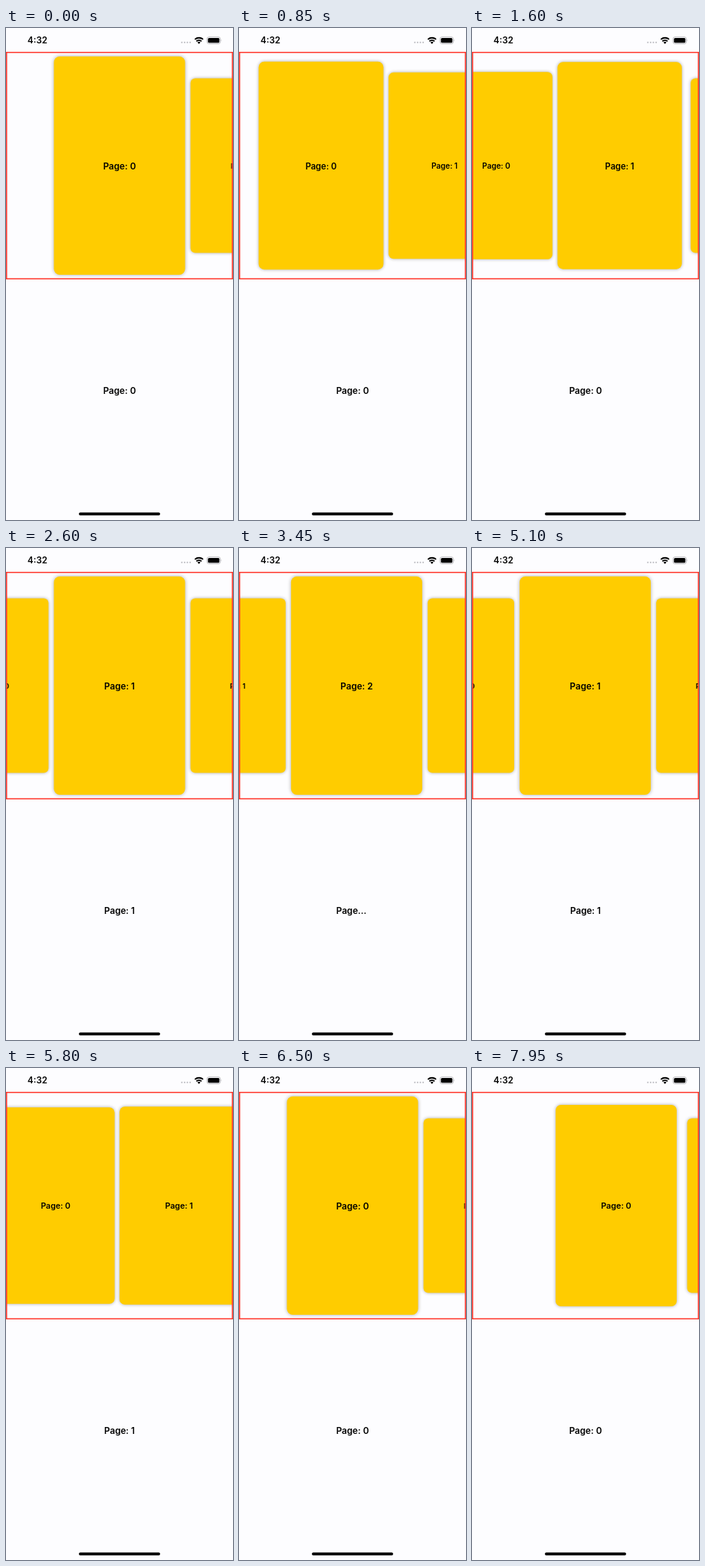
Recreate the animation shown at these times as an HTML page. Size 296x640 px, loop 8 s.

```html
<!DOCTYPE html>
<html lang="en">
<head>
<meta charset="utf-8">
<title>Page carousel</title>
<style>
  html, body { margin: 0; width: 100%; height: 100%; overflow: hidden; background: #fdfdff; }
  svg { display: block; width: 100%; height: 100%; }
  text { font-family: Inter, Roboto, sans-serif; font-size: 11.7px; font-weight: 600; text-anchor: middle; }
</style>
</head>
<body>
<svg viewBox="0 0 296 640">
  <defs>
    <filter id="soft" x="-10%" y="-10%" width="120%" height="120%">
      <feGaussianBlur stdDeviation="2.5"/>
    </filter>
  </defs>
  <rect width="296" height="640" fill="#fdfdff"/>

  <text x="41" y="20.2" style="font-size:11.5px">4:32</text>
  <g id="dots" fill="#b9b9be"></g>
  <g fill="none" stroke="#000" stroke-width="1.9">
    <path d="M246.3 14.9a7.6 7.6 0 0 1 10.6 0"/>
    <path d="M248.3 17.3a4.8 4.8 0 0 1 6.6 0"/>
  </g>
  <path d="M251.6 20.7l-1.9-2a2.7 2.7 0 0 1 3.8 0z"/>
  <rect x="262" y="11.7" width="17.6" height="8.8" rx="2.6" fill="none" stroke="#b0b0b4" stroke-width=".8"/>
  <rect x="263.3" y="13" width="15" height="6.2" rx="1.5"/>
  <path d="M280.6 14.6q1.3 1.5 0 3z" fill="#b0b0b4"/>

  <g id="cards"></g>
  <rect x=".75" y="31.75" width="294.5" height="294.5" fill="none" stroke="#ff3b30" stroke-width="1.5"/>
  <text id="label" y="475.8"></text>
  <rect x="95" y="630.2" width="106" height="3.8" rx="1.9"/>
</svg>
<script>
const LOOP = 8000, PITCH = 161, CX = 148, CY = 179, W = 171, H = 284;
const NS = "http://www.w3.org/2000/svg";

// Each swipe: start page, direction, release time, [time, travelled share] points
const swipes = [
  { from: 0, dir: 1, release: 1850, pts: [[500, 0], [850, .254], [1400, .62], [1850, .85], [1970, .966], [2150, 1]] },
  { from: 1, dir: 1, release: 3350, pts: [[2600, 0], [3000, .46], [3350, .85], [3450, .966], [3650, 1]] },
  { from: 2, dir: -1, release: 4850, pts: [[4100, 0], [4600, .557], [4850, .83], [4980, .966], [5200, 1]] },
  { from: 1, dir: -1, release: 6250, pts: [[5500, 0], [5800, .481], [6050, .72], [6250, .86], [6330, .966], [6500, 1]] },
  { from: 0, dir: -1, release: LOOP, pull: 1.62, pts: [[7450, 0], [7700, .145], [7950, .248], [8000, .25]] }
];

const clamp = (v, lo, hi) => Math.max(lo, Math.min(hi, v));

function add(parent, tag, attrs) {
  const el = document.createElementNS(NS, tag);
  for (const k in attrs) el.setAttribute(k, attrs[k]);
  return parent.appendChild(el);
}

// Smooth curve through the points, at rest at both ends
function curve(pts, t) {
  const last = pts.length - 1;
  if (t <= pts[0][0]) return 0;
  if (t >= pts[last][0]) return pts[last][1];
  const i = pts.findIndex(p => p[0] > t) - 1;
  const slope = j => j === 0 || j === last ? 0
    : (pts[j + 1][1] - pts[j - 1][1]) / (pts[j + 1][0] - pts[j - 1][0]);
  const [t0, a] = pts[i], [t1, b] = pts[i + 1], d = t1 - t0, u = (t - t0) / d;
  const ease = u * u * (3 - 2 * u);
  return a + (b - a) * ease + d * u * (1 - u) * ((1 - u) * slope(i) - u * slope(i + 1));
}

function cardScale(distance) {
  const d = clamp(Math.abs(distance), 0, 1);
  return 1 - .2 * d + .015 * d * (1 - d);
}

const dots = document.getElementById("dots");
for (let i = 0; i < 4; i++) add(dots, "circle", { cx: 229.3 + i * 3.6, cy: 18.8, r: 1 });

const holder = document.getElementById("cards");
const cards = [0, 1, 2, 3].map(n => {
  const g = add(holder, "g", {});
  const box = { x: -W / 2, y: -H / 2, width: W, height: H, rx: 7.5 };
  add(g, "rect", { ...box, opacity: .33, filter: "url(#soft)" });
  add(g, "rect", { ...box, fill: "#ffcc00" });
  add(g, "text", { y: 4.8 }).textContent = "Page: " + n;
  return g;
});
const label = document.getElementById("label");

function draw(t) {
  const s = swipes.filter(w => t >= w.pts[0][0]).pop() || swipes[0];
  const moved = curve(s.pts, t);
  // Sizes settle slightly before the position does
  const sized = s.pull ? moved * s.pull : Math.min(1, moved + .04 * Math.max(0, (moved - .7) / .266));
  const pos = s.from + s.dir * moved, sizePos = s.from + s.dir * sized;
  cards.forEach((g, n) => {
    g.setAttribute("transform",
      `translate(${CX + (n - pos) * PITCH} ${CY}) scale(${cardScale(n - sizePos)})`);
  });

  const page = t < s.release ? s.from : s.from + s.dir;
  const end = s.pts[s.pts.length - 1][0];
  // A wider new label is cut short until its room has grown
  const cut = t >= s.release && t < end && page !== 1;
  label.textContent = cut ? "Page..." : "Page: " + page;
  label.setAttribute("x", cut ? 146.5 : CX);
}

const start = performance.now();
function tick(now) {
  draw(Math.max(0, now - start) % LOOP);
  requestAnimationFrame(tick);
}
draw(0);
requestAnimationFrame(tick);
</script>
</body>
</html>
```
